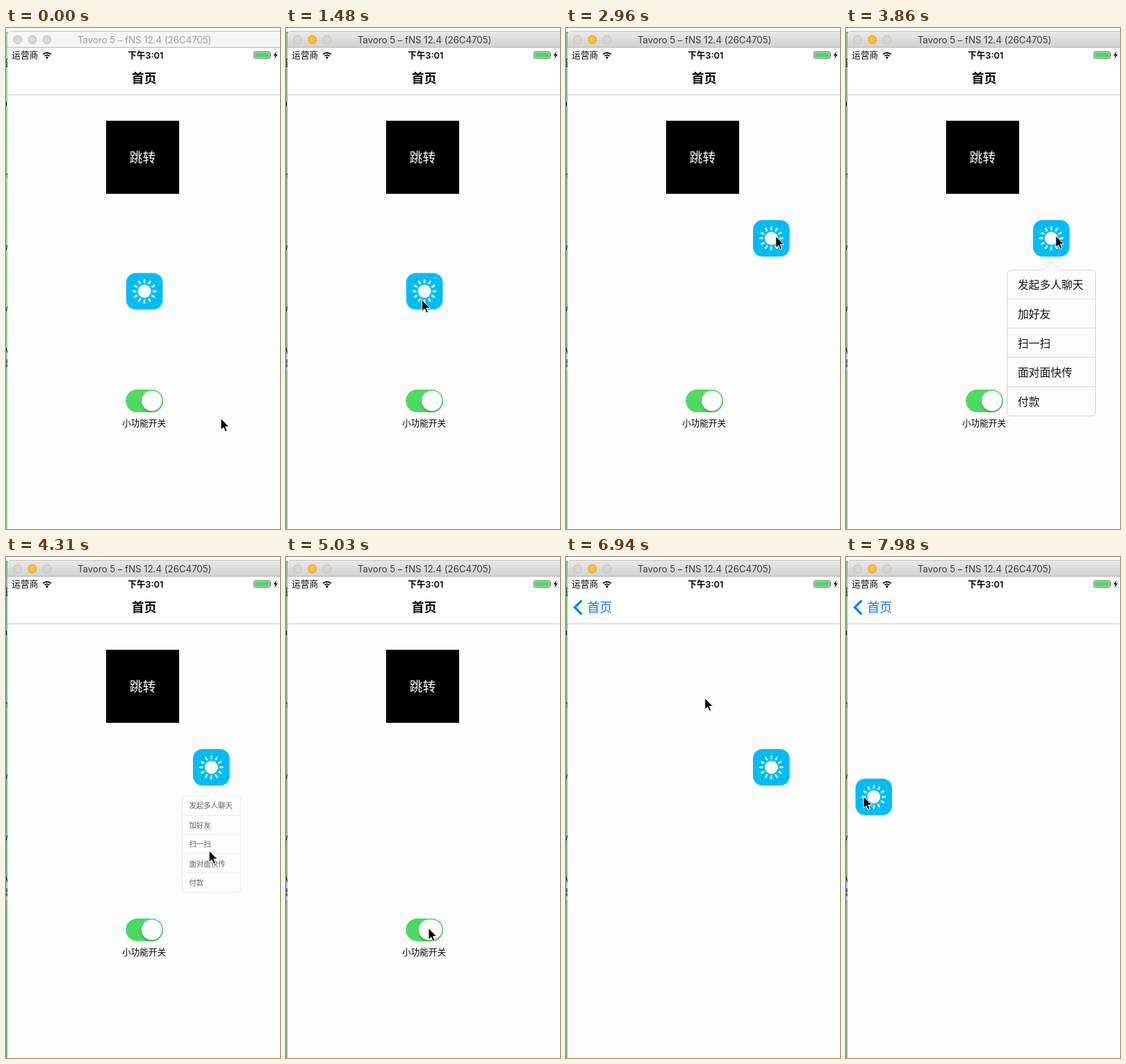
These frames come from a looping animation (375 px wide and 686 px high, 8000 ms). An HTML page:

```html
<!DOCTYPE html>
<html lang="zh">
<head>
<meta charset="utf-8">
<style>
  html, body { margin: 0; width: 100%; height: 100%; overflow: hidden; background: #fff; }
  svg { display: block; width: 375px; height: 686px; }
  text { font-family: "Noto Sans CJK SC", "Noto Sans CJK", sans-serif; }
  .mid { text-anchor: middle; }
  .latin { font-family: Inter, sans-serif; font-size: 12.8px; letter-spacing: -.1px; }
  .time { font: 600 12px Inter, "Noto Sans CJK SC", "Noto Sans CJK", sans-serif; }
  .rays { stroke: #fff; stroke-width: 2.4; stroke-linecap: round; }
  .wifi { fill: none; stroke: #000; stroke-width: 1.7; }
  #thumb { y: 496.5px; height: 28px; filter: drop-shadow(0 2px 1.5px rgba(0, 0, 0, .28)); }
</style>
</head>
<body>
<svg viewBox="0 0 375 686">
  <defs>
    <linearGradient id="chrome" x2="0" y2="1">
      <stop stop-color="#e9e9e9"/><stop offset="1" stop-color="#d0d0d0"/>
    </linearGradient>
  </defs>

  <!-- strip of the window behind -->
  <rect y="5" width="3" height="681" fill="#96d69c" id="strip"/>
  <rect y="447" width="3" height="23" fill="#a9bde0"/>
  <g font-size="13" fill="#222" text-anchor="end">
    <text x="4" y="52">当</text><text x="2" y="107">a</text><text x="4" y="206">h</text>
    <text x="3" y="304">w</text><text x="3" y="388">w</text><text x="3" y="445">A</text>
    <text x="5" y="464">录</text>
  </g>

  <!-- window -->
  <rect x="2" y="20" width="375" height="668" fill="#fdfdfd"/>
  <path d="M2 27V10Q2 4.500 7.500 4.500H375V27Z" fill="#f6f6f6"/>
  <path d="M2 27V10Q2 4.500 7.500 4.500H375V27Z" fill="url(#chrome)" id="active"/>
  <path d="M4 5Q5 4.500 8 4.500H375" fill="none" stroke="#c4c4c4"/>
  <path d="M2 26.500H375" stroke="#b9b9b9"/>
  <g fill="#d6d6d6" stroke="#c3c3c3">
    <circle cx="16" cy="16" r="5.700"/>
    <circle cx="36" cy="16" r="5.700" id="minimize"/>
    <circle cx="56" cy="16" r="5.700"/>
  </g>
  <text class="latin mid" x="189.500" y="20.700" fill="#9c9c9c" id="caption">Tavoro 5 – fNS 12.4 (26C4705)</text>

  <!-- first page -->
  <g id="home">
    <rect x="137" y="127" width="100" height="100"/>
    <text class="mid" x="187" y="184" font-size="18" fill="#fff">跳转</text>
    <rect x="164.750" y="495.750" width="49.500" height="29.500" rx="14.750" stroke-width="1.500" id="track"/>
    <rect rx="14" fill="#fff" id="thumb"/>
    <text class="mid" x="189" y="545.500" font-size="12">小功能开关</text>
  </g>
  <rect x="2" y="92" width="375" height="594" fill="#fdfdfd" id="detail"/>

  <!-- status and navigation bars -->
  <rect x="2" y="27" width="375" height="64" fill="#fff"/>
  <path d="M2 91.500H375" stroke="#cbcbcb"/>
  <text x="8" y="41.500" font-size="12">运营商</text>
  <path class="wifi" d="M50.700 36.100a7.700 7.700 0 0 1 11 0M52.900 38.500a4.600 4.600 0 0 1 6.600 0"/>
  <circle cx="56.200" cy="40.400" r="1.500"/>
  <text class="time mid" x="191" y="41.500">下午3:01</text>
  <rect x="339.500" y="32.500" width="22" height="9" rx="1.500" fill="#fff" stroke="#555" stroke-width=".8"/>
  <rect x="340.500" y="33.500" width="20" height="7" fill="#4cd964"/>
  <path d="M362.500 35q1.500 2 0 4Z" fill="#555"/>
  <path d="M370.500 32L366 37.600H368.700L367.300 42L372 36.200H369.200Z"/>
  <text class="mid" x="189" y="75.300" font-size="17" font-weight="600" id="title">首页</text>
  <g id="back">
    <path d="M21.500 59.500L12 69L21.500 78.500" fill="none" stroke="#007aff" stroke-width="3"/>
    <text x="29" y="75.300" font-size="17" fill="#007aff">首页</text>
  </g>

  <!-- menu, its origin at the arrow tip -->
  <g id="menu">
    <path d="M-55 12H-14Q-10 12 -7.500 8.500L-2.500 2Q0 -.5 2.500 2L7.500 8.500Q10 12 14 12H55Q60.500 12 60.500 18V206Q60.500 211.500 55 211.500H-55Q-60.500 211.500 -60.500 206V18Q-60.500 12 -55 12Z" fill="#fdfdfd" stroke="#d2d2d2"/>
    <g id="rows" font-size="15" fill="#111"></g>
  </g>

  <g id="button">
    <rect width="50" height="50" rx="13" fill="#00bcf2"/>
    <circle cx="25" cy="25" r="9" fill="#fff"/>
    <g class="rays" id="rays"></g>
  </g>

  <path d="M0 0V16L3.700 12.600L6.100 18.200L8.700 17.100L6.300 11.600H11.300Z" stroke="#fff" id="cursor"/>
</svg>
<script>
const LOOP = 8000;
const $ = id => document.getElementById(id);
const at = (x, y) => ({ transform: `translate(${x}px, ${y}px)` });

$('rays').innerHTML = Array.from({ length: 12 }, (_, i) =>
  `<path d="M25 12.700V9.600" transform="rotate(${i * 30} 25 25)"/>`).join('');
$('rows').innerHTML = ['发起多人聊天', '加好友', '扫一扫', '面对面快传', '付款'].map((label, i) =>
  (i ? `<path d="M-60 ${11.5 + i * 40}H60" stroke="#d8d8d8"/>` : '') +
  `<text x="-46" y="${37.7 + i * 40}">${label}</text>`).join('');

// Each state [ms, style] holds until the next one.
function play(id, states) {
  const frames = states.map(([ms, style]) => ({ offset: ms / LOOP, easing: 'steps(1, end)', ...style }));
  frames.push({ ...frames.at(-1), offset: 1 });
  $(id).animate(frames, { duration: LOOP, iterations: Infinity });
}

const path = (id, stops) => play(id, stops.map(([ms, x, y]) => [ms, at(x, y)]));

path('cursor', [
  [0, 294, 534.5], [590, 288, 600], [740, 226, 452], [890, 186, 373], [1190, 186, 372],
  [2660, 231, 328], [2810, 290, 289], [2960, 287, 285], [3860, 287, 284.5],
  [4000, 284, 330], [4150, 278, 402], [4450, 265, 440], [4600, 235, 478],
  [4740, 205, 505], [4890, 195, 508], [6210, 195, 490], [6360, 193, 350],
  [6510, 190, 210], [6650, 190, 193], [7240, 250, 255], [7390, 282, 288],
  [7540, 222, 297], [7690, 149, 311], [7830, 70, 322], [7980, 24, 328]
]);

const button = (ms, x, y, opacity = 1) => [ms, { ...at(x, y), opacity }];
play('button', [
  button(0, 164.5, 335.5), button(2660, 200, 307), button(2810, 259, 268), button(2960, 256, 263),
  button(5030, 256, 263, 0), button(6210, 256, 263), button(7540, 211, 272),
  button(7690, 138, 286), button(7830, 59, 297), button(7980, 13, 303.5)
]);

const menu = (ms, x, y, size) =>
  [ms, { transform: `translate(${x}px, ${y}px) scale(${size})`, opacity: size > .02 ? size : size * 30 }];
const opened = (x, y, open, close) => [
  menu(open, x, y, .01), menu(open + 150, x, y, .62), menu(open + 290, x, y, 1),
  menu(close, x, y, .66), menu(close + 150, x, y, 0)
];
play('menu', [
  menu(0, 189.5, 391.5, 0), ...opened(189.5, 391.5, 1480, 2220), ...opened(281, 319.5, 3410, 4300)
]);

const on = { fill: '#4cd964', stroke: '#4cd964' };
const off = { fill: '#fdfdfd', stroke: '#e5e5e5' };
play('track', [
  [0, on], [5180, { fill: '#eaf5ec', stroke: '#b9e5c2' }], [5330, off],
  [6060, { fill: '#e5e5e5', stroke: '#e5e5e5' }], [6210, on]
]);
const thumb = (ms, x, width) => [ms, { x: x + 'px', width: width + 'px' }];
play('thumb', [
  thumb(0, 185.5, 28), thumb(5030, 181.5, 32), thumb(5180, 166, 32), thumb(5330, 165.5, 28),
  thumb(6060, 165.5, 32), thumb(6210, 181.5, 32), thumb(6360, 185.5, 28)
]);

// The old page moves off at 30 % of the speed of the new one.
const push = [[0, 0], [6650, .33], [6800, .93], [6940, 1]];
path('home', push.map(([ms, p]) => [ms, -112 * p, 0]));
path('detail', push.map(([ms, p]) => [ms, 375 * (1 - p), 0]));
play('title', push.map(([ms, p]) => [ms, { ...at(-143 * p, 0), opacity: Math.max(0, 1 - 1.2 * p) }]));
play('back', push.map(([ms, p]) => [ms, { ...at(p ? 100 * (1 - p) : 0, 0), opacity: p * p }]));

const activate = (id, before, after) => play(id, [[0, before], [1480, after]]);
activate('active', { opacity: 0 }, { opacity: 1 });
activate('caption', { fill: '#9c9c9c' }, { fill: '#3d3d3d' });
activate('minimize', { fill: '#d6d6d6', stroke: '#c3c3c3' }, { fill: '#fdbe2e', stroke: '#e0a122' });
activate('strip', { fill: '#96d69c' }, { fill: '#82b588' });
</script>
</body>
</html>
```
